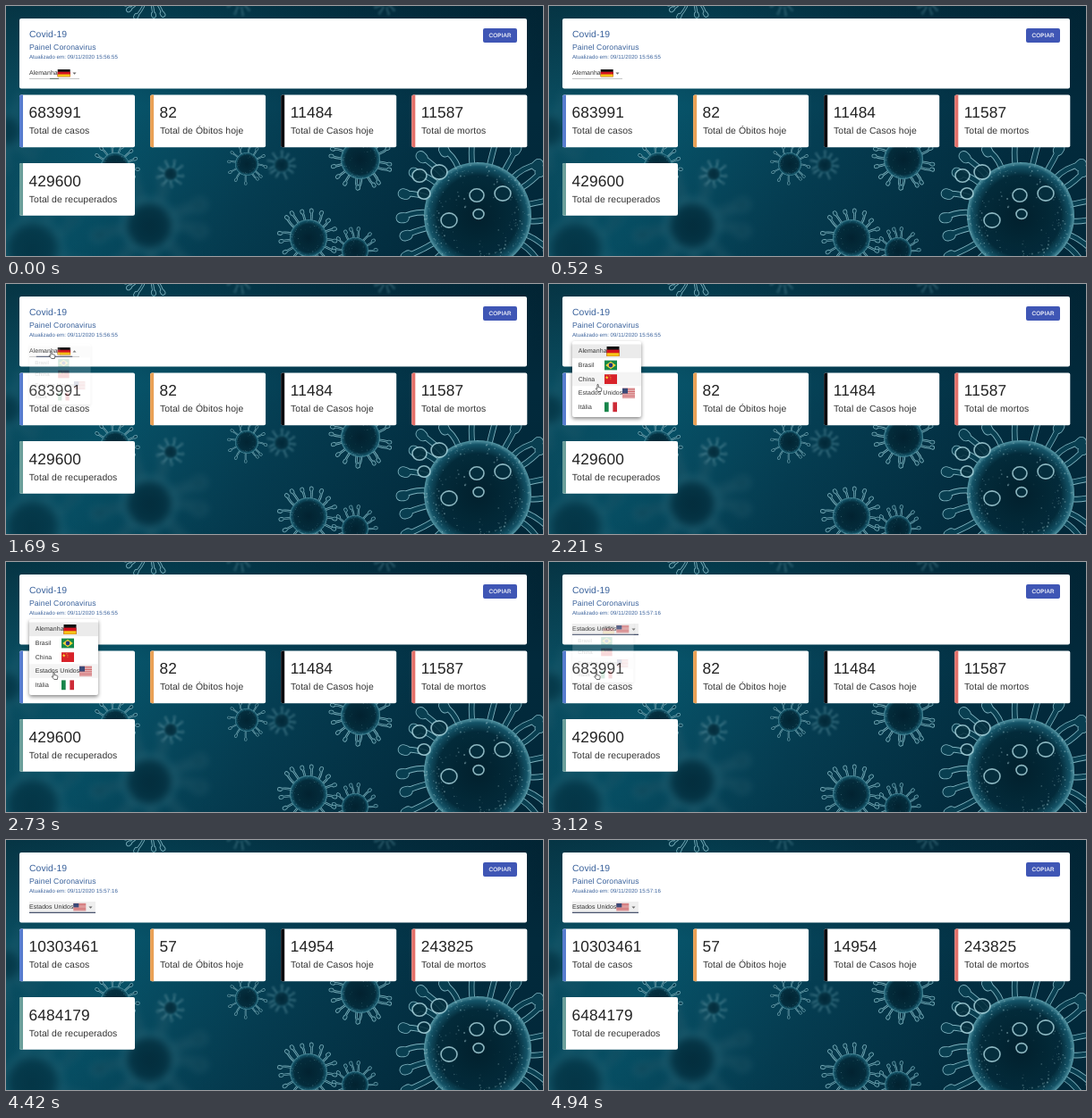
An HTML page for the animation above (5720 ms loop, 600x280 px).

```html
<!DOCTYPE html>
<html lang="pt">
<head>
<meta charset="utf-8">
<title>Painel Coronavirus</title>
<style>
html, body { margin: 0; width: 100%; height: 100%; overflow: hidden; background: #04303f; }
svg { display: block; }
text { font: 6.95px "Liberation Sans", Arial, sans-serif; letter-spacing: .0094em; fill: #333; text-rendering: geometricPrecision; }
.blue { fill: #39619b; }
.title, .label { font-size: 10.4px; letter-spacing: .0075em; }
.sub { font-size: 8.65px; letter-spacing: .1px; }
.stamp { font-size: 6.1px; letter-spacing: .04px; }
.value { font-size: 17.3px; letter-spacing: .0073em; fill: #222; }
.button { font-size: 6.3px; letter-spacing: .15px; fill: #fff; stroke: #fff; stroke-width: .15px; }
.card { fill: #fff; }
</style>
</head>
<body>
<svg id="stage" width="600" height="280" viewBox="0 0 600 280">
  <defs>
    <linearGradient id="sea" x2="1" y2=".2">
      <stop stop-color="#0a4a5c"/><stop offset=".3" stop-color="#075369"/>
      <stop offset=".58" stop-color="#053f54"/><stop offset="1" stop-color="#022a3c"/>
    </linearGradient>
    <linearGradient id="shade" x2="0" y2="1">
      <stop stop-color="#011a26" stop-opacity=".45"/><stop offset=".4" stop-color="#011a26" stop-opacity="0"/>
      <stop offset="1" stop-color="#011a26" stop-opacity=".12"/>
    </linearGradient>
    <radialGradient id="body">
      <stop stop-color="#02202d"/><stop offset=".75" stop-color="#042b3a"/>
      <stop offset=".92" stop-color="#15566a"/><stop offset="1" stop-color="#5c9eac"/>
    </radialGradient>
    <g id="de"><path d="M0 0h14v10H0z" fill="#111"/><path d="M0 3.3h14V10H0z" fill="#d5121e"/><path d="M0 6.7h14V10H0z" fill="#f5c518"/></g>
    <g id="br"><path d="M0 0h14v10H0z" fill="#14894a"/><path d="M1.2 5 7 1l5.8 4L7 9z" fill="#f4d13a"/><circle cx="7" cy="5" r="2.3" fill="#203a80"/></g>
    <g id="cn"><path d="M0 0h14v10H0z" fill="#d8222a"/><path d="m2.7 1.2.5 1.4h1.4l-1.1.9.4 1.4-1.2-.8-1.2.8.4-1.4-1.1-.9h1.4zM5.5 1h.8v.8h-.8zm1 1.5h.8v.8h-.8zm0 1.6h.8v.8h-.8z" fill="#f7d531"/></g>
    <g id="us"><path d="M0 0h14v10H0z" fill="#f0e4e2"/><path d="M0 .4h14M0 1.94h14M0 3.48h14M0 5h14M0 6.54h14M0 8.08h14M0 9.62h14" stroke="#c8444a" stroke-width=".77"/><path d="M0 0h6v5.4H0z" fill="#3a4a78"/></g>
    <g id="it"><path d="M0 0h14v10H0z" fill="#fff"/><path d="M0 0h4.67v10H0z" fill="#17854a"/><path d="M9.33 0H14v10H9.33z" fill="#cd2a36"/></g>
  </defs>
  <rect width="600" height="280" fill="url(#sea)"/>
  <rect width="600" height="280" fill="url(#shade)"/>
  <g id="viruses"></g>

  <rect class="card" x="15" y="14" width="567" height="78.5" rx="2"/>
  <text class="title blue" x="26" y="34.9">Covid-19</text>
  <text class="sub blue" x="26" y="48.5">Painel Coronavirus</text>
  <text class="stamp blue" x="26" y="58.9" id="stamp"></text>
  <rect x="533" y="25" width="38" height="16" rx="2" fill="#3f56b5"/>
  <text class="button" x="539.6" y="35.2">COPIAR</text>

  <g id="select">
    <rect id="focus" x="26" y="69" width="74" height="12.5" fill="#efefef"/>
    <text x="26" y="77.2" id="country"></text>
    <use id="flag"/>
    <path id="arrow" d="M-2-1h4L0 1.2z" fill="#666"/>
    <path id="line" stroke-width=".7"/>
    <path id="accent" stroke-width="1.1"/>
  </g>
  <g id="cards"></g>

  <g id="menu">
    <rect x="26" y="64" width="77" height="85" rx="2" fill="#fff" style="filter:drop-shadow(0 2px 2px #0007)"/>
    <rect x="26" y="67.5" width="77" height="15.6" fill="#ebebeb"/>
    <rect id="hover" x="26" width="77" height="15.6" fill="#f4f4f4"/>
    <g id="items"></g>
  </g>
  <path id="hand" d="M2 .5q1-.5 1.2.6v2.4l3 .8q.8.3.6 1.3L6.3 8.5H2.800L.4 5.600q-.2-1 .7-.8l.8.6z" fill="#fff" stroke="#222" stroke-width=".65"/>
</svg>
<script>
const LOOP = 5720, STEP = 130;
const $ = id => document.getElementById(id);
const set = (id, attrs) => Object.entries(attrs).forEach(([k, v]) => $(id).setAttribute(k, v));
const clamp = v => Math.max(0, Math.min(1, v));
const mix = (a, b, p) => a + (b - a) * p;

let seed = 7;
const random = () => (seed = seed * 16807 % 2147483647) / 2147483647;

// Dark body with a speckled bright rim and outlined, club-shaped spikes
function virus(x, y, r, spikes, length, opacity, blur = 0) {
  let stems = '', knobs = '', dots = '';
  const at = (a, d) => `${(Math.cos(a) * d).toFixed(1)} ${(Math.sin(a) * d).toFixed(1)}`;
  for (let i = 0; i < spikes; i++) {
    const a = (i + random() * .4) / spikes * 2 * Math.PI, bend = (random() - .5) * .25;
    const end = r + length * (.7 + random() * .3);
    stems += `M${at(a, r * .97)}Q${at(a, r + length * .4)} ${at(a + bend, end)}`;
    knobs += `M${at(a + bend, end - length * .1)}L${at(a + bend, end)}`;
  }
  for (let i = 0; i < r * 7; i++) {
    const [cx, cy] = at(random() * 2 * Math.PI, r * random() ** .2).split(' ');
    dots += `<circle cx="${cx}" cy="${cy}" r="${(.3 + random() * r / 80).toFixed(2)}" opacity="${(random() * .5).toFixed(2)}"/>`;
  }
  const edge = Math.min(1.7, length * .13);
  const tube = (color, trim) => `<g fill="none" stroke="${color}" stroke-linecap="round">
    <path d="${stems}" stroke-width="${length * .2 - trim}"/><path d="${knobs}" stroke-width="${length * .36 - trim}"/></g>`;
  return `<g transform="translate(${x} ${y})" opacity="${opacity}" style="${blur ? `filter:blur(${blur}px)` : ''}">
    ${tube('#86bac6', 0)}${tube('#0a4052', edge)}
    <circle r="${r}" fill="url(#body)"/>
    <g fill="#b4dbe2">${dots}</g></g>`;
}

const ring = (x, y, r) => `<ellipse cx="${x}" cy="${y}" rx="${r}" ry="${r * .9}" fill="#06303f" stroke="#a5d0d9" stroke-width="1.6" opacity=".85"/>`;

$('viruses').innerHTML = [
  [160, 246, 30, 9, 36, .65, 4], [30, 272, 34, 9, 30, .5, 5], [0, 140, 20, 9, 24, .45, 5],
  [122, 180, 16, 14, 11, .85, .4], [160, -16, 16, 14, 16, .9, .5], [262, -6, 8, 10, 8, .5, 1],
  [184, 188, 8, 9, 8, .7, 1.2], [269, 177, 13, 12, 9, .85, .6], [308, 178, 9, 11, 7, .7, .8],
  [424, -4, 6, 10, 8, .5, 1], [338, 260, 21, 17, 13, .85, .5], [390, 274, 15, 14, 11, .85, .5],
  [396, 172, 22, 18, 13, .9, .2], [527, 235, 60, 22, 33, .95]
].map(v => virus(...v)).join('') +
  [[526, 212, 8], [555, 210, 9], [495, 240, 9], [528, 233, 6], [462, 190, 8], [484, 186, 9], [467, 210, 7]].map(v => ring(...v)).join('');

const cards = [
  ['Total de casos', '#587dcf', 683991, 10303461],
  ['Total de Óbitos hoje', '#e9a055', 82, 57],
  ['Total de Casos hoje', '#06060c', 11484, 14954],
  ['Total de mortos', '#e4716a', 11587, 243825],
  ['Total de recuperados', '#6c9f9b', 429600, 6484179]
];
$('cards').innerHTML = cards.map(([label, color], i) =>
  `<g transform="translate(${15 + i % 4 * 146.1} ${i < 4 ? 99.5 : 176})">
    <rect class="card" width="129" height="58.7" rx="2"/>
    <path d="M4 0H2Q0 0 0 2v54.7q0 2 2 2h2z" fill="${color}"/>
    <text class="value" x="10.5" y="25.6" id="value${i}"></text>
    <text class="label" x="10.8" y="43.9">${label}</text></g>`).join('');

const items = [['Alemanha', 'de', 64.5], ['Brasil', 'br', 62], ['China', 'cn', 62], ['Estados Unidos', 'us', 82], ['Itália', 'it', 62]];
$('items').innerHTML = items.map(([name, code, x], i) =>
  `<text x="32.8" y="${77.3 + i * 15.6}">${name}</text>
   <use href="#${code}" transform="translate(${x} ${70 + i * 15.6}) scale(1 1.08)"/>`).join('');

// Pointer path: time, x, y
const path = [[650, 46, 76], [1040, 46, 74], [1560, 48, 75], [1690, 48, 75], [2210, 52, 112], [2730, 51, 123], [3380, 50, 123]];
function pointer(t) {
  const i = Math.max(1, path.findIndex(p => p[0] >= t));
  const [a, b] = [path[i - 1], path[i]], p = clamp((t - a[0]) / (b[0] - a[0]));
  return [mix(a[1], b[1], p), mix(a[2], b[2], p)];
}

function draw(t) {
  const chosen = t >= 2990, loaded = t >= 3250, opened = t >= 1560;
  const [name, code] = items[chosen ? 3 : 0];
  const width = chosen ? 74 : 56, middle = 26 + width / 2;
  $('stamp').textContent = 'Atualizado em: 09/11/2020 ' + (chosen ? '15:57:16' : '15:56:55');
  $('country').textContent = name;
  set('focus', { visibility: chosen ? 'visible' : 'hidden' });
  set('flag', { href: '#' + code, transform: `translate(${chosen ? 75.3 : 57.7} 71) scale(1 .82)` });

  const open = chosen ? 1 - clamp((t - 2990) / 290) : clamp((t - 1560) / 235);
  set('arrow', { transform: `translate(${width + 20.5} 75.5) scale(1 ${opened && !chosen ? -1 : 1})` });

  const hovered = t >= 650;
  const half = width / 2 * (t < STEP ? .18 : opened ? clamp((t - 1560) / 180) : 0);
  set('line', { d: `M26 81.4h${width}`, stroke: hovered && !opened ? '#333' : '#aaa' });
  set('accent', { d: `M${middle - half} 81.4h${half * 2}`, stroke: opened ? '#49546f' : '#6c7f75', visibility: half ? 'visible' : 'hidden' });

  set('menu', {
    opacity: open ** 3,
    transform: `translate(28 78) scale(${mix(.75, 1, open)} ${mix(.5625, 1, open)}) translate(-28 -78)`
  });
  const [x, y] = pointer(t);
  const row = Math.max(0, Math.min(4, Math.floor((y - 67.5) / 15.6)));
  set('hover', { y: 67.5 + row * 15.6, visibility: row ? 'visible' : 'hidden' });
  set('hand', { transform: `translate(${x} ${y})`, visibility: hovered && t < 3380 ? 'visible' : 'hidden' });
  cards.forEach((card, i) => $('value' + i).textContent = card[loaded ? 3 : 2]);
}

function tick() {
  const t = performance.now() % LOOP;
  draw(Math.floor(t / STEP) * STEP);
  requestAnimationFrame(tick);
}
tick();
</script>
</body>
</html>
```
